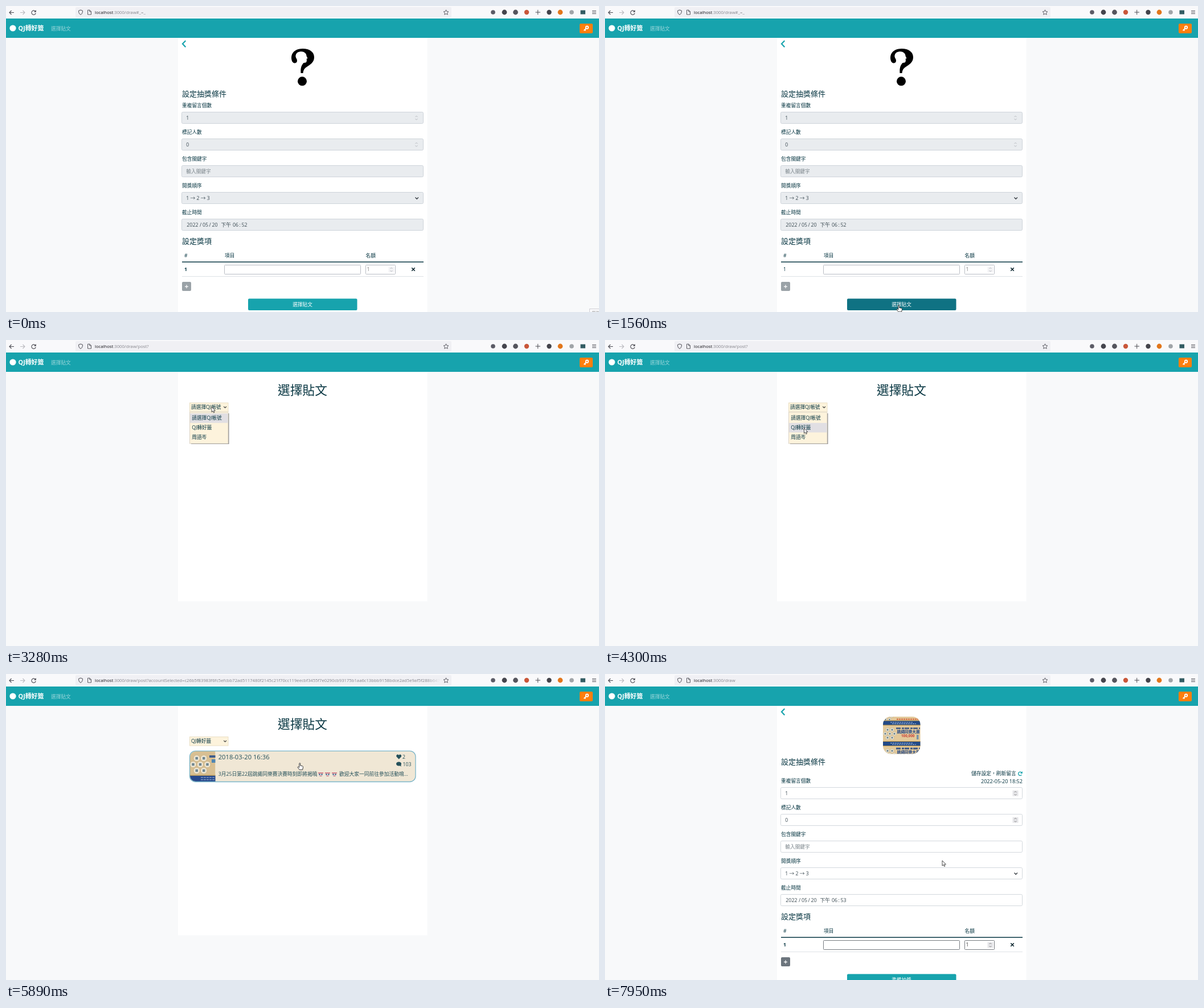
Write an HTML page that moves like this. It is 1041x538 px and loops after 7990 ms.

```html
<!DOCTYPE html>
<html lang="zh-Hant">
<head>
<meta charset="utf-8">
<title>Prize draw</title>
<style>
html,body{margin:0;width:100%;height:100%;overflow:hidden;background:#f8f9fa}
svg{display:block;width:1041px;height:538px}
text{font-family:"Open Sans","Noto Sans CJK TC","Noto Sans CJK",sans-serif;white-space:pre}
</style>
</head>
<body>
<svg id="stage" viewBox="0 0 1041 538"></svg>
<script>
const LOOP = 7990, INK = '#073642', TEAL = '#17a3ad', BRAND = 'QJ轉好籤';
const HASH = 'c26b5f83983f6fc5efcbb72ad5117480f2145c21f70cc119eecbf3455f7e0290cb93175b1aa6c13bbb9158bdce2ad5e9af5f288b647';

const text = (x, y, size, str, fill = INK, more = '') =>
  `<text x="${x}" y="${y}" font-size="${size}" fill="${fill}" ${more}>${str}</text>`;
const rect = (x, y, w, h, fill, more = '') =>
  `<rect x="${x}" y="${y}" width="${w}" height="${h}" fill="${fill}" ${more}/>`;
const dot = (x, y, r, fill, more = '') => `<circle cx="${x}" cy="${y}" r="${r}" fill="${fill}" ${more}/>`;
const line = (d, color, width = 1, more = '') =>
  `<path d="${d}" fill="none" stroke="${color}" stroke-width="${width}" ${more}/>`;
const shape = (d, fill, more = '') => `<path d="${d}" fill="${fill}" ${more}/>`;
const group = (id, body, more = '') => `<g id="${id}" ${more}>${body}</g>`;

const BOLD = 'font-weight="700"', SEMI = 'font-weight="500"', MID = 'text-anchor="middle"';

function browser() {
  const c = '#4a4a52';
  return rect(0, 0, 1041, 22, '#f9f9fb') + rect(122, 2, 660, 18, '#f0f0f4', 'rx="2"') +
    line('M14 11.5H6M9.5 8L6 11.5L9.5 15', c, 1.1) +
    line('M25 11.5H33M29.500 8L33 11.500L29.500 15', '#bbbbc0', 1.1) +
    group('reload', line('M51.500 9.300A3.700 3.700 0 1 0 52.200 12.500', c, 1.1) + shape('M52.800 7V10.800H49Z', c)) +
    group('stop', line('M45.300 8.300L51.700 14.700M51.700 8.300L45.300 14.700', c, 1.1)) +
    line('M131 7L134.500 8.300C134.500 12 133.500 14 131 15.300C128.500 14 127.500 12 127.500 8.300Z', c) +
    line('M143.500 7.200H147L149.500 9.700V15H143.500ZM146.800 7.200V10H149.500', c, .9) +
    line('M772.500 6.800L773.800 9.600L776.800 10L774.600 12.100L775.200 15.200L772.500 13.700L769.800 15.200L770.400 12.100L768.200 10L771.200 9.600Z', c, .9) +
    `<g clip-path="url(#bar)"><text x="156" y="13.700" font-size="7.700" fill="#15141a">localhost<tspan id="path" fill="#85858c"></tspan></text></g>` +
    rect(738, 3, 25, 16, 'url(#fade)') +
    dot(855, 11, 3.8, '#5b5b66') +
    dot(875, 11, 4.4, '#45454d') + dot(894.5, 11, 4.4, '#55555d') +
    dot(914, 11, 4.2, '#c9573a') +
    line('M929.500 11H938M933.700 6.800V15.300', c, 1) + dot(953.5, 11, 4.2, '#43434b') +
    dot(973, 11, 4.4, '#e2761b') + dot(993, 11, 3.8, '#a0a4a8') +
    rect(1008.5, 7.5, 8.5, 7, '#335c63') +
    line('M1029 8.500H1036M1029 11H1036M1029 13.500H1036', c, .9);
}

function header() {
  return rect(0, 22, 1041, 34, TEAL) + dot(12, 39, 5.6, '#fff') +
    text(21.5, 43.3, 10.85, BRAND, '#fff', BOLD) + text(79, 42.5, 8.7, '選擇貼文', '#9bd6da') +
    rect(1007, 31, 23, 17, '#ff7f0e', 'rx="2"') +
    dot(1020, 37.7, 2.2, 'none', 'stroke="#fff" stroke-width="1.800"') +
    line('M1018.300 39.400L1014.500 43.200M1016 41.800L1017.500 43.300', '#fff', 1.7);
}

function stepper(x, y, color, bg) {
  return (bg ? rect(x - 5, y - 5, 10, 10, bg) : '') +
    line(`M${x - 2} ${y - 1.5}l2 -2l2 2M${x - 2} ${y + 1.5}l2 2l2 -2`, color, .9);
}

function questionMark() {
  return shape('M501 91C501 81 509 75 521 75C533 75 541 81 541 90C541 99 534 103 528 107C523 110 522 114 521.500 118H517.500C517 110 518 105 522.500 100L526 99.500C528 99 527.500 97 528 95L527.500 93L529.500 92L527.500 88C527.500 83 523 80 518 80C512 80 508 84 508.500 89C509 92 511 93 511 96C511 99 509 100.500 507 100.500C503 100.500 501 96 501 91Z', '#000') +
    dot(520, 132.3, 8, '#000');
}

// ring of white badges on the poster
function badges(cx, cy, gap, r) {
  let out = '';
  for (let i = 0; i < 7; i++) {
    const a = i * Math.PI / 3, d = i < 6 ? gap : 0;
    const x = cx + d * Math.cos(a), y = cy + d * Math.sin(a);
    out += dot(x, y, r, '#efe6d2', `stroke="#c0a878" stroke-width=".6"`) +
      rect(x - r * .4, y - r * .4, r * .8, r * .8, '#6f8792');
  }
  return out;
}

function poster() {
  const navy = '#234a86', band = y => rect(488, y, 66, 8, navy) +
    line(`M488 ${y}H554M488 ${y + 8}H554`, '#c49a4b', 1.2) +
    line(`M501 ${y + 3}H540M504 ${y + 5.5}H546`, '#a9bddb', 1, 'stroke-dasharray="3 1"');
  return `<g clip-path="url(#round)">` + rect(488, 75, 66, 66, '#e3c99a') +
    badges(496, 74, 7, 3.2) + line('M512 79.500H550', '#d0663f', 2, 'stroke-dasharray="3 1"') + band(82) +
    badges(500, 105, 8, 3.8) +
    line('M511 95.500H553', '#3a5584', 2.5, 'stroke-dasharray="8 2 4 1"') +
    text(512.5, 103.7, 6.7, '跳繩同樂大賽', '#1f4587', BOLD) +
    text(520, 111, 6.3, '100,000', '#c63d35', BOLD) + rect(547, 107, 3.5, 8, '#7893a8') +
    band(118.5) + badges(500, 142, 8, 3.8) +
    line('M511 131H553', '#3a5584', 3, 'stroke-dasharray="8 2 4 1"') +
    text(512.5, 139.5, 6.7, '跳繩同樂大賽', '#1f4587', BOLD) + '</g>';
}

function form(on) {
  const fill = on ? '#fff' : '#e9ecef', edge = on ? '#d3d8dd' : '#ced4da';
  const arrow = on ? '#777' : '#aeb2b6', cell = on ? '#777b80' : '#b9bdc4';
  const labels = ['重複留言個數', '標記人數', '包含關鍵字', '開獎順序', '截止時間'];
  const values = ['1', '0', '輸入關鍵字', '1 → 2 → 3'];
  const stepBg = on ? '#e6e6e9' : '';
  let rows = '';
  labels.forEach((name, i) => {
    const y = 47 * i;
    rows += text(309, 178.3 + y, 8.7, name) +
      rect(308.5, 186.5 + y, 424, 20, fill, `rx="2" stroke="${edge}"`);
    if (values[i]) rows += text(316.3, 199.8 + y, 8.7, values[i], i == 2 ? '#7b858b' : '#3b4a52');
    if (i < 2) rows += stepper(720.5, 196.7 + y, arrow, stepBg);
  });
  rows += line('M718.500 336.500L721.200 339.300L724 336.500', '#343a40', 1.3);
  const date = [[317.3, '2022'], [340, '/'], [345, '05'], [356.5, '/'], [361.5, '20'],
    [377.5, '下午'], [398, '06'], [409.5, ':'], [413.5, on ? '53' : '52']];
  date.forEach(([x, s]) => rows += text(x, 387.8, 8.9, s, '#3b4a52'));
  rows += text(309, 418, 13, '設定獎項', INK, SEMI) +
    text(313, 441.6, 8.7, '#', INK, SEMI) + text(384, 441.6, 8.7, '項目', INK, SEMI) +
    text(631.5, 441.6, 8.7, '名額', INK, SEMI) + rect(309, 449.3, 424, 1.5, INK) +
    text(313, 466.2, 8.7, '1', INK, `${BOLD} ${on ? '' : 'id="rowNo"'}`) +
    rect(383.5, 455.5, 239, 16, '#fff', `rx="1" stroke="${cell}"`) +
    rect(631.5, 455.5, 52, 16, '#fff', `rx="1" stroke="${cell}"`) +
    text(633.5, 466.4, 8.7, '1', on ? '#333' : '#777') +
    stepper(676.5, 463.5, arrow, on ? stepBg : '#f3f3f5') +
    line('M712.300 460.300L717.800 465.800M717.800 460.300L712.300 465.800', '#05222b', 1.6) +
    rect(309, 475, 424, 1, '#dee2e6') +
    rect(309, 485, 16, 16, on ? '#6c757d' : '#9aa2a7', 'rx="2"') +
    line('M314 493.300H320M317 490.300V496.300', '#fff', 1.2) +
    rect(425, 514.5, 191.5, 20.5, TEAL, `rx="2" ${on ? '' : 'id="submit"'}`) +
    text(520.5, 528, 8.7, on ? '準備抽獎' : '選擇貼文', '#fff', `${MID} ${SEMI}`);
  return rect(302, 56, 437.5, 482, '#fff') +
    line('M315.300 61L310 66.600L315.300 72.200', TEAL, 2.2) + (on ? poster() : questionMark()) +
    text(309, 159, 13, '設定抽獎條件', INK, SEMI) +
    (on ? text(643, 178.3, 8.75, '儲存設定，刷新留言') +
      line('M731 173A3.200 3.200 0 1 0 731.500 177', TEAL, 1.3) + shape('M732.800 171V175H728.800Z', TEAL) +
      text(733, 191.5, 9.1, '2022-05-20 18:52', INK, 'text-anchor="end"') : '') +
    `<g transform="translate(0 ${on ? 13 : 0})">${rows}</g>`;
}

function card() {
  const ink = '#24505a';
  const face = x => dot(x, 176.5, 4, '#dce6ee') + rect(x - 4.5, 173, 9, 2, '#d8848a') +
    dot(x - 2, 176.5, 1.2, '#43566f') + dot(x + 2, 176.5, 1.2, '#43566f') + rect(x - 2, 178.6, 4, 1.3, '#d96a6a');
  return rect(322.5, 135.3, 396.5, 54.2, '#f0e7d5', 'rx="10"') +
    `<g clip-path="url(#thumb)">` + rect(323, 136, 44.5, 53, '#d8bf92') + rect(357, 143, 11, 4, '#3f5d8c') +
    rect(361, 150, 7, 6, '#4f86b4') + badges(341, 159, 12.5, 5.6) +
    rect(323, 178.5, 45, 11, '#27498c') + rect(323, 177.5, 45, 1.2, '#c79f52') +
    line('M342 182H366M342 185.800H366', '#a9bddb', 1, 'stroke-dasharray="4 1"') + '</g>' +
    rect(322.5, 135.3, 396.5, 54.2, 'none', 'rx="10" stroke="#7cb6c9" stroke-width="1.300"') +
    text(372.7, 149.7, 11.2, '2018-03-20 16:36', ink) +
    shape('M689.700 149.800L685.800 145.800C683.800 143 687.500 139.700 689.700 142.800C691.900 139.700 695.600 143 693.600 145.800Z', ink) +
    text(696, 148.8, 8.7, '2', ink) +
    shape('M689.500 154.500C692.300 154.500 694 156 694 158C694 159.200 693.500 160 693 160.500L694.300 162.300C693 162.300 692 162 691.200 161.300C687.500 162.200 685 160.300 685 158C685 156 687 154.500 689.500 154.500Z', ink) +
    text(696.5, 161.8, 8.7, '103', ink) +
    text(372.7, 179.3, 8.75, '3月25日第22屆跳繩同樂賽決賽時刻即將揭曉', ink) +
    face(552.5) + face(564.5) + face(576.5) +
    text(585, 179.3, 8.75, '歡迎大家一同前往參加活動唷...', ink);
}

function picker() {
  const ask = '請選擇QJ帳號';
  const names = [ask, BRAND, '周語岑'];
  return rect(302, 56, 437.5, 403.5, '#fff') +
    text(520.5, 96, 21.7, '選擇貼文', INK, MID) + group('card', card()) +
    rect(322.5, 110.5, 67.5, 15.5, '#fdf3dc', 'stroke="#eadfc4"') +
    `<text id="choice" x="325" y="121.300" font-size="8.700" fill="${INK}"></text>` +
    line('M382.300 117L384.600 119.300L386.900 117', '#333', 1.1) +
    group('menu', rect(325, 129, 66.5, 54, '#8d8d8d') + rect(322.5, 127, 67.5, 55, '#fdf3dc', 'stroke="#d5cdbd" stroke-width=".800"') +
      rect(323, 129, 66.5, 16.7, '#e1dfe3', 'id="mark"') +
      names.map((s, i) => text(326.2, 140.2 + i * 17, 8.7, s)).join(''));
}

function spinner() {
  let out = '';
  for (let i = 0; i < 8; i++) {
    const a = -Math.PI / 2 - i * Math.PI / 4;
    out += dot(9.7 * Math.cos(a), 9.7 * Math.sin(a), [2.8, 2.3, 1.8, 1.5, 1.25, 1.1, .95, .85][i], TEAL);
  }
  return out;
}

const stage = document.getElementById('stage');
stage.innerHTML = `<defs>
  <clipPath id="bar"><rect x="150" y="2" width="612" height="18"/></clipPath>
  <clipPath id="round"><rect x="488" y="75" width="65.500" height="65.500" rx="14"/></clipPath>
  <clipPath id="thumb"><path d="M367.500 136V189H333A10 10 0 0 1 323 179V146A10 10 0 0 1 333 136Z"/></clipPath>
  <linearGradient id="fade"><stop offset="0" stop-color="#f0f0f4" stop-opacity="0"/><stop offset="1" stop-color="#f0f0f4"/></linearGradient>
  </defs>` + rect(0, 0, 1041, 538, '#f8f9fa') +
  group('setup', form(false)) + group('picker', picker()) + group('ready', form(true)) +
  header() + browser() + group('spin', spinner()) +
  group('status', rect(-1, 529.5, 141, 10, '#f9f9fb', 'stroke="#dcdce0"') + text(0, 536.6, 6.8, 'ocalhost', '#333')) +
  group('corner', rect(1024.5, 532.5, 20, 10, '#f9f9fb', 'stroke="#cfcfd4"') + text(1028, 542, 6.5, '傳輸', '#999')) +
  group('arrow', shape('M0 0V9.200L2.100 7.300L3.500 10.400L5 9.700L3.600 6.700H6.400Z', '#fff', 'stroke="#222" stroke-width=".800"')) +
  group('hand', shape('M-1.200 1C-1.200 -.300 .700 -.300 .700 1V4.500L4.300 5.300C5.300 5.600 5.600 6.200 5.500 7.200L4.700 11.800H-.800L-3.900 7.800C-4.300 6.800 -3 6.200 -2.300 6.900L-1.200 7.900Z', '#fff', 'stroke="#222" stroke-width=".900"'));

const el = {};
stage.querySelectorAll('[id]').forEach(n => el[n.id] = n);
const show = (id, on) => el[id].style.display = on ? '' : 'none';

// time, x, y of the pointer tip
const MOVES = [[210, 1003, 62], [1000, 710, 206], [1040, 710, 211], [1560, 516, 526], [1830, 516, 526],
  [2600, 428, 302], [2640, 428, 302], [3140, 361, 117.5], [3280, 361, 117.5], [3750, 346, 167], [4070, 346, 167],
  [4300, 349.5, 155], [4570, 349.5, 155], [5340, 440, 159], [5800, 516, 156.5], [6700, 516, 156.5],
  [7190, 392.500, 138.5], [7300, 392.5, 138.5], [7760, 586, 316], [7800, 586, 316], [7950, 592, 328], [LOOP, 592, 328]];
const PAGE = { picker: 2300, posts: 5150, ready: 7520 };

function pointer(t) {
  const i = Math.max(1, MOVES.findIndex(m => m[0] > t));
  const [t0, x0, y0] = MOVES[i - 1], [t1, x1, y1] = MOVES[i];
  const p = Math.max(0, (t - t0) / (t1 - t0)), e = p * p * (3 - 2 * p);
  return [x0 + (x1 - x0) * e, y0 + (y1 - y0) * e];
}

const within = (t, spans) => spans.some(([a, b]) => t >= a && t < b);

function render(t) {
  const [x, y] = pointer(t);
  const setup = t < PAGE.picker, ready = t >= PAGE.ready, posts = t >= PAGE.posts;
  show('setup', setup);
  show('picker', !setup && !ready);
  show('ready', ready);
  show('card', posts);

  const onButton = setup && x > 425 && x < 616 && y > 515;
  const onCard = posts && !ready;
  const hand = onButton || onCard;
  el.submit.setAttribute('fill', onButton ? '#0f7283' : TEAL);
  el.rowNo.setAttribute('font-weight', t < 1300 ? 700 : 500);

  show('menu', t >= 3280 && t < 4570);
  const row = y < 146 ? 0 : y < 162.5 ? 1 : 2;
  el.mark.setAttribute('y', 129 + row * 16.8);
  el.choice.textContent = t < 4570 ? '請選擇QJ帳號' : BRAND;

  el.path.textContent = ':3000/draw' + (setup ? '#_=_' : ready ? '' : '/post?' + (posts ? 'accountSelected=' + HASH : ''));
  const busy = within(t, [[1900, 2660], [4650, 5410], [6190, 7840]]);
  show('stop', busy);
  show('reload', !busy);
  show('status', within(t, [[1950, 2560], [4700, 5450], [7000, 7600]]));
  show('corner', t < 40);

  show('spin', within(t, [[4610, 5410], [6110, PAGE.ready]]));
  const turn = Math.floor((t - 7130) / 125) * 45;
  el.spin.setAttribute('transform', `translate(520.700 281.300) rotate(${turn})`);

  const at = `translate(${x.toFixed(2)} ${y.toFixed(2)})`;
  el.arrow.setAttribute('transform', at);
  el.hand.setAttribute('transform', at);
  show('arrow', t >= 210 && !hand);
  show('hand', t >= 210 && hand);
}

const start = performance.now();
function tick(now) {
  render(Math.max(0, now - start) % LOOP);
  requestAnimationFrame(tick);
}
render(0);
requestAnimationFrame(tick);
</script>
</body>
</html>
```
